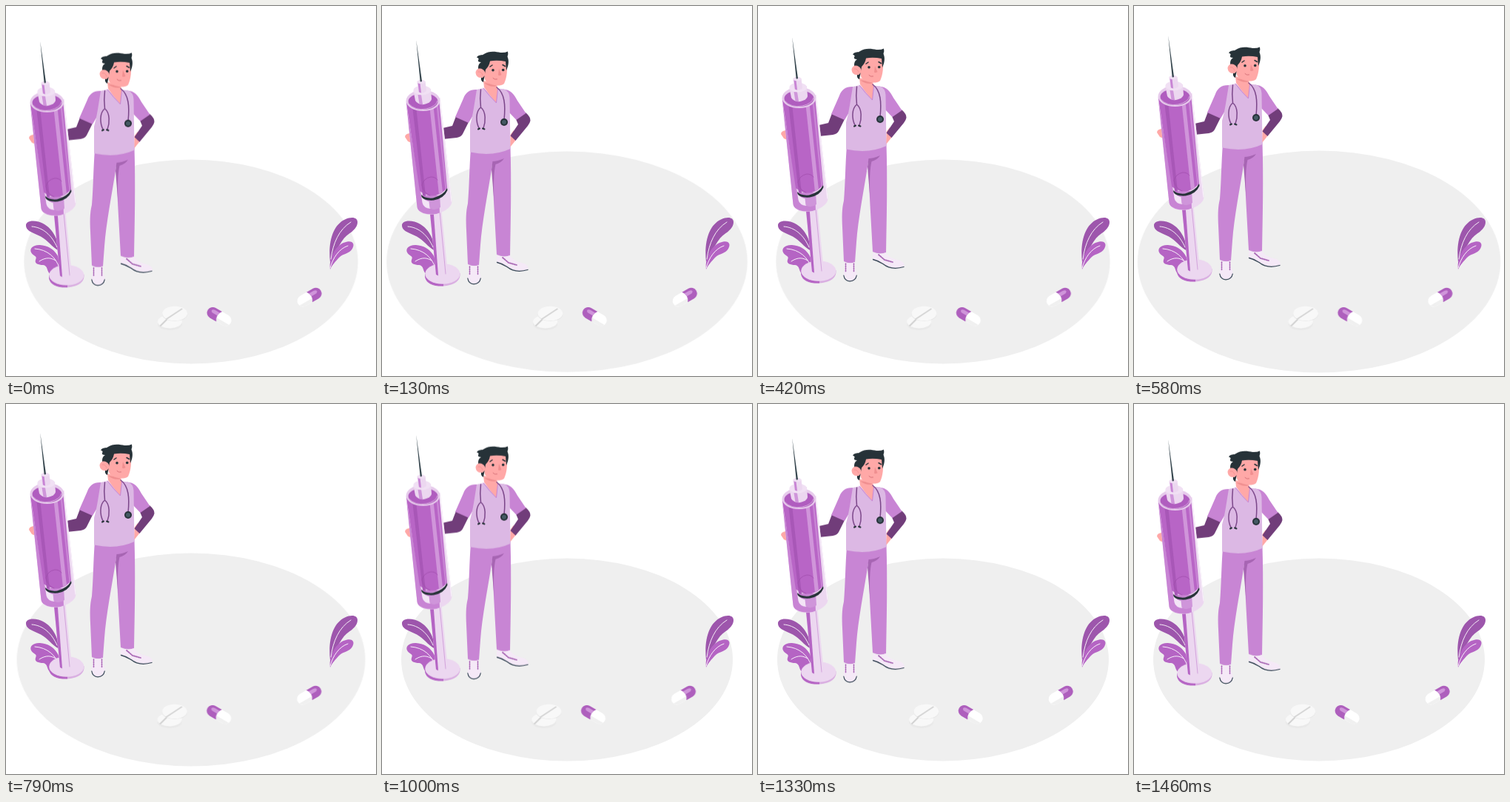
Animation, 500 px wide and 500 px high, one loop 1500 ms. Source, as an HTML page:

```html
<!DOCTYPE html>
<html lang="en">
<head>
<meta charset="utf-8">
<title>Nurse with syringe</title>
<style>
  html, body { margin: 0; width: 100%; height: 100%; overflow: hidden; background: #fff; }
  svg { display: block; width: 100vw; height: 100vh; }
  #floor { transform-origin: 250px 345.5px; }
  .line { fill: none; stroke-linecap: round; stroke-linejoin: round; }
</style>
</head>
<body>
<svg viewBox="0 0 500 500">
  <defs>
    <g id="capsule">
      <path d="M0-7.8H10A7.8 7.8 0 0 1 10 7.8H0Q-6 0 0-7.8Z" fill="#fff"/>
      <path d="M-2.500 3H17.2A7.8 7.8 0 0 1 10 7.8H0Z" fill="#f0f0f0"/>
      <path d="M0-7.8H-10A7.8 7.8 0 0 0-10 7.8H0Q-6 0 0-7.8Z" fill="#ae5fbd"/>
      <path d="M-1.800-4.800H-9Q-13-4.500-13-1.8Q-12 .2-9 .2H-3Q-3-2-1.800-4.800Z" fill="#cf95da"/>
    </g>
    <clipPath id="barrel">
      <path d="M32.500 131L47.500 274C49 282 59 285 71 283.500C84 281 95 274 94.500 265L78.500 126Z"/>
    </clipPath>
  </defs>

  <ellipse id="floor" cx="250" cy="345.500" rx="224" ry="137" fill="#efefef"/>

  <g id="leaves">
    <path d="M72 331C70 312 60 296 44 291.500C33 289 26.500 292 27 297C27.500 305 39 307 47 311.500C57 317 61 325 72 331Z" fill="#9d56ac"/>
    <path d="M74 363C77 342 66 324 46 323C36 322.500 31.500 328 34 333C36 338 43 337 40 343C38 348 44 350 50 350C58 351 54 361 62 363Z" fill="#b564c4"/>
    <path class="line" d="M35 298C50 299 62 310 69 326M39 328C56 329 68 340 72 354M45 345C54 339 61 340 67 344" stroke="#fff" stroke-width=".9"/>
    <path d="M438 346C435 318 442 296 458 288.500C468 284 475 286 475 292C475 303 462 307 456 315C450 323 445 333 438 346Z" fill="#9d56ac"/>
    <path d="M438 356C436 338 447 321 461 318.500C469 317 471.500 322 468 328C464 335 456 334 450 340C445 346 441 349 438 356Z" fill="#b564c4"/>
    <path class="line" d="M466 292C450 302 442 320 439 342M462 324C450 328 442 340 438 354" stroke="#fff" stroke-width=".9"/>
  </g>

  <g id="pills">
    <g transform="translate(221.500 427.500)">
      <path d="M-16.500-1V3C-15 13 15 13 16.500 3V-1Z" fill="#e9e9e9"/>
      <ellipse rx="16.500" ry="9" cy="-1" fill="#f8f8f8"/>
      <path d="M-13 5L-4-4" stroke="#d2d2d2" stroke-width="2"/>
    </g>
    <g transform="translate(228.300 415.500)">
      <path d="M-16.800 0V2C-15 13 15 13 16.800 2V0Z" fill="#e4e4e4"/>
      <ellipse rx="16.800" ry="9.800" fill="#f8f8f8"/>
      <path d="M-12 8L10-6.500" stroke="#d6d6d6" stroke-width="2"/>
    </g>
    <use href="#capsule" transform="translate(288.200 419.700) rotate(30)"/>
    <use href="#capsule" transform="translate(410.200 393.600) rotate(-30) scale(-1 1)"/>
  </g>

  <g id="nurse">
    <!-- arms -->
    <path d="M100 151L117 159L109 175Q107 179 101 180L82 182V167L95 164Z" fill="#713d7a"/>
    <path d="M40 174Q31 174 31 179Q33 182 35 185L42 188Z" fill="#ffa8a7"/>
    <path d="M178 170L173.500 176L173 193L181 183Z" fill="#ffa8a7"/>
    <path d="M181 155L194 146Q201 152 200.500 157Q200 160 197 164L180.500 184L173.500 177.500L184 162Z" fill="#713d7a"/>
    <path d="M129 115C118 114.500 113 119 110 127L99 152L117 160L124 148Z" fill="#c884d4"/>
    <path d="M163 114.500C174 115 178 121 183 130L194.500 147L181.500 156L171 145Z" fill="#c884d4"/>

    <!-- trousers -->
    <path d="M120 194C118 220 118 246 116 269C113 281 113.500 292 114 305L116 351Q124 355 131 352L133 325C135 295 143 255 149 217L151 266L155 338Q163 342 173 339.500C174 290 175 240 173.500 192Z" fill="#c885d4"/>
    <path d="M165 208Q156 212 149.500 212L148 223L151.500 266Q150 230 153.500 216Q161 214 165 208Z" fill="#a765b3"/>

    <!-- tunic -->
    <path d="M128 115L138 113L154 130L157 113.500L165 114.500Q172 117 172.500 126L173.500 195Q150 206 119 199.500V163Q122 153 124 140Z" fill="#dcb8e4"/>
    <path d="M137 103L138 112Q145 122 154.500 133L156.500 114L155 108Z" fill="#ffa8a7"/>
    <path d="M138 106Q145 112 154 110.500L154 108Z" fill="#f08f90"/>
    <path class="line" d="M137 113Q145 124 154.500 133L156.500 114" stroke="#c884d4" stroke-width="1"/>

    <!-- head -->
    <path d="M140 77C137 88 136 102 143 106C150 110 160 111 165 107C169 98 170 88 168 75Q153 68 140 77Z" fill="#ffa8a7"/>
    <path d="M128 71.500C131 67 135 69 137 67.500C145 62 154 64 160 65Q166 65.500 170 63.500Q171 67 169.500 70.500C172 76 171 83 168 89L167 77Q156 75 146 76.500Q145 83 140 88L139 94L137 105Q133 103 134 99L131 91C129 85 130 80 134 78Q129 78 130 75Q132 73 128 71.500Z" fill="#263238"/>
    <path d="M139 91C136 84.500 127 85 126.500 92Q127 100 136 99L140 95Z" fill="#ffa8a7"/>
    <path class="line" d="M130 91Q134 90 136 95" stroke="#f08f90" stroke-width=".8"/>
    <path class="line" d="M146 84L149 82M163 81.500L166.500 83.500" stroke="#263238" stroke-width="1.500"/>
    <circle cx="150" cy="88.700" r="1.800" fill="#263238"/>
    <circle cx="163.700" cy="88.500" r="1.800" fill="#263238"/>
    <path d="M158 87L161.500 95Q159 96.500 157 95.500Z" fill="#f08f90"/>
    <path class="line" d="M150 99.500Q152 102 155.500 101" stroke="#d8737a" stroke-width="1"/>

    <!-- stethoscope -->
    <path class="line" d="M133.500 115Q132 127 133.500 139M133.500 139C126 145 127 159 131 167M133.500 139C141 145 140 159 137 167M155 112C166 120 167 136 165 156" stroke="#7c478a" stroke-width="1.500"/>
    <path class="line" d="M130 168.500L132 167.500M136 167.500L138.500 168.500" stroke="#263238" stroke-width="2"/>
    <circle cx="165" cy="159" r="5" fill="#263238"/>
    <circle cx="165" cy="159" r="3" fill="#455a64"/>

    <!-- shoes -->
    <path d="M116.500 352Q124 355 130.500 352L131 361C135 367 134 375 130 377Q124 379 119 376C115 373 115 366 117 362Z" fill="#f5e9f7"/>
    <path class="line" d="M115.800 370Q117 377.500 124 377.800Q132 377.500 133.300 370" stroke="#334452" stroke-width="1.200"/>
    <path class="line" d="M118.500 354V365M129.500 354V365" stroke="#a765b3" stroke-width="1.600" stroke-dasharray="1.500 1.500"/>
    <path d="M155.500 339Q163 343 172.500 339C177 346 184 348 192 350Q199 353 197.500 358Q190 362 181 360C173 358 166 351 156 350Q154 347 155.500 339Z" fill="#f5e9f7"/>
    <path class="line" d="M155.500 348.500Q162 350 169 354.500Q180 363.500 197 358.500" stroke="#334452" stroke-width="1.300"/>
    <path class="line" d="M163 342L171 349L182 352" stroke="#a765b3" stroke-width="1.800" stroke-dasharray="1.600 1.500"/>

    <!-- plunger -->
    <path d="M58 364V368C60 385 104 385 105.500 366V363Z" fill="#d9aee1"/>
    <path d="M58 364V368C60 378 70 381 83 380.500V370Z" fill="#b564c4"/>
    <ellipse cx="81.800" cy="364" rx="23.600" ry="13.800" fill="#ecd7f0"/>
    <path d="M64.500 278L73 365Q80 370 89 364L80 275Z" fill="#ecd7f0"/>
    <path d="M64.500 278L73 365L76 366.500L69.500 278Z" fill="#b564c4"/>
    <path class="line" d="M78 280L86 364" stroke="#d3a3dc" stroke-width="1"/>

    <!-- barrel -->
    <g clip-path="url(#barrel)">
      <path d="M30 115H97V290H30Z" fill="#ecd7f0"/>
      <path d="M32 130L47 276Q55 286 78 283L77 258H53Z" fill="#c884d4"/>
      <path d="M53 258Q58 266 64 266L65.500 276Q56 275 54.500 268Z" fill="#f3e4f6"/>
      <path d="M63 262L64.500 275Q71 280 79 274L78 258Z" fill="#cf95da"/>
      <path d="M33 133L51 252Q70 267 88 248L77 128Z" fill="#b865c6"/>
      <path d="M41 137L55 258L59 259L46 138Z" fill="#a857b7"/>
      <path d="M64 135L77 257L82 254L69 133Z" fill="#d095da"/>
      <path d="M73 132L85.500 251L87.500 249L75.500 130Z" fill="#c884d4"/>
      <path class="line" d="M54 244Q56 235 66 233Q72 233 75 237M54 244Q56 255 65 258" stroke="#a14fae" stroke-width=".8"/>
      <path d="M53 257Q58 262.500 69 261.500Q83 258 88 248L88.500 251Q84 262 70 264.500Q57 265.500 53.500 260Z" fill="#263238"/>
      <path class="line" d="M78 127L94 266" stroke="#f8effa" stroke-width="1.500"/>
    </g>
    <ellipse cx="55.500" cy="130" rx="23" ry="14" fill="#e7cbec"/>
    <ellipse cx="55.500" cy="131" rx="20" ry="11" fill="#b05dbf"/>
    <path class="line" d="M36 134Q45 144 60 141Q73 138 75 130" stroke="#d7a9df" stroke-width="1"/>
    <path d="M42.500 117L45 130Q49 136 57 135Q66 133 67 128L66 114Z" fill="#ecd7f0"/>
    <path d="M48.500 122L50.500 134.500Q53 135.500 55 135L53 122Z" fill="#cf95da"/>
    <ellipse cx="54.200" cy="116" rx="11.800" ry="6.500" fill="#f1e0f4"/>
    <path d="M47.500 104L49 118Q54 122 60 117L58.500 104Z" fill="#ecd7f0"/>
    <path d="M48.500 106L50 118.500L53 119.500L51.500 106.500Z" fill="#c884d4"/>
    <ellipse cx="53" cy="104.500" rx="5.500" ry="2.800" fill="#f1e0f4"/>
    <path d="M46.200 48L51.600 104Q53 105 54 103.500Z" fill="#37474f"/>
  </g>
</svg>
<script>
  const PERIOD = 1500;

  // steps: [offset, transform] pairs; lead: ms already played at load
  function loop(id, easing, lead, steps) {
    const frames = steps.map(([offset, transform]) => ({ offset, transform, easing }));
    document.getElementById(id).animate(frames, {
      duration: PERIOD, iterations: Infinity, iterationStart: lead / PERIOD
    });
  }

  const rise = y => `translate(0px, ${y}px)`;
  const slide = x => `translate(${x}px, 0px)`;
  const grow = s => `scale(${s})`;

  loop('nurse', 'linear', 25, [[0, rise(0)], [.5, rise(-10)], [1, rise(0)]]);
  loop('floor', 'ease-in-out', 40,
    [[0, 1], [.14, 1.095], [.28, 1], [.42, 1.095], [.7, 1], [1, 1]].map(([o, s]) => [o, grow(s)]));
  loop('pills', 'linear', 25,
    [0, -1, 2, -4, 4, -4, 4, -4, 2, -1, 0].map((x, i) => [i / 10, slide(x)]));
</script>
</body>
</html>
```
